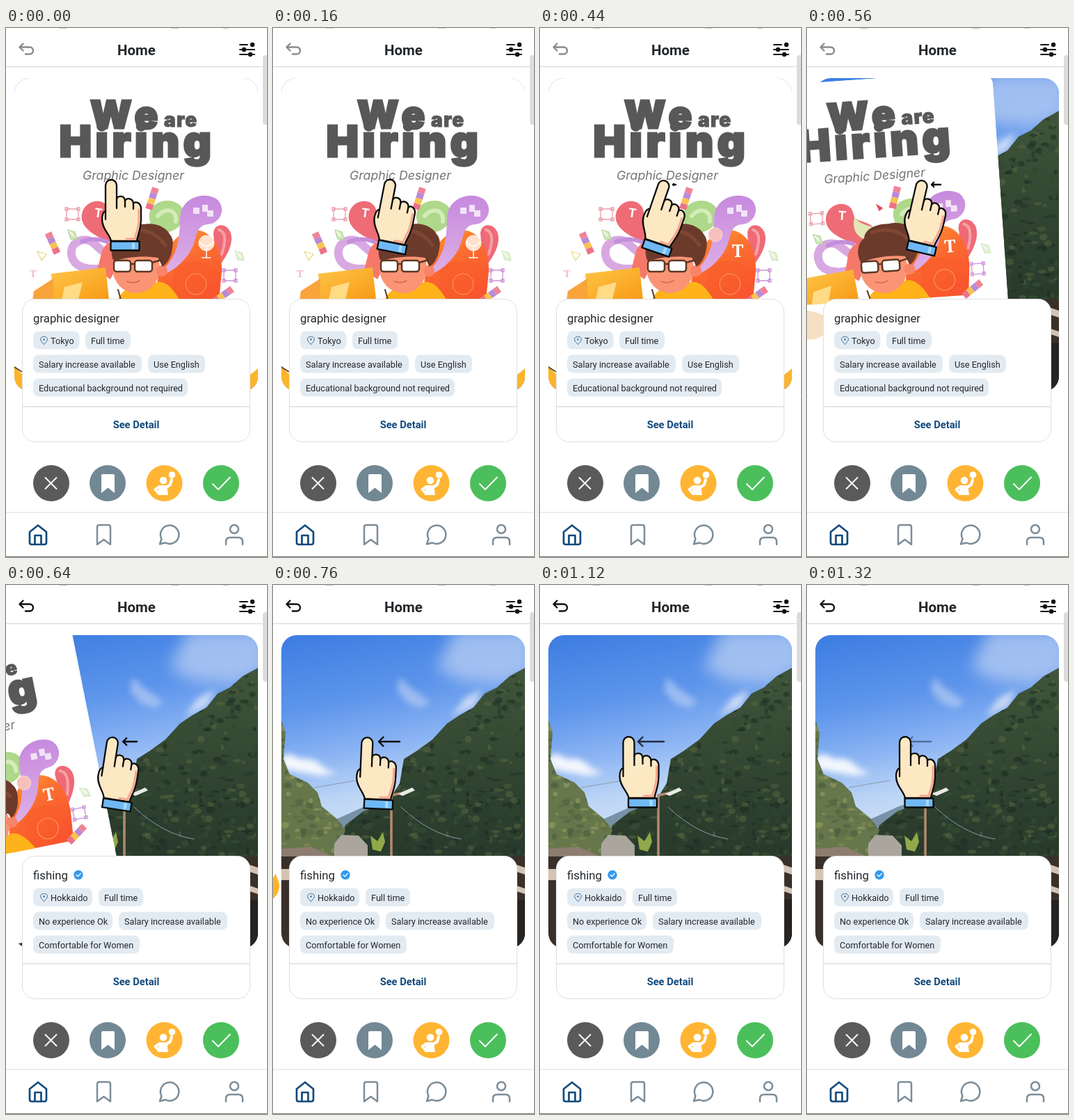
These frames come from a looping animation (375 px wide and 760 px high, 1.36 s). An HTML page:

```html
<!DOCTYPE html>
<html lang="en">
<head>
<meta charset="utf-8">
<title>Job swipe</title>
<style>
html, body { margin: 0; width: 100%; height: 100%; overflow: hidden; background: #fff; }
svg { display: block; width: 375px; height: 760px; }
text { font-family: Roboto, "Open Sans", sans-serif; fill: #23272b; }
.display { font-family: Inter, "Open Sans", sans-serif; fill: #585858; stroke: #585858; font-weight: 900; }
.role { font-family: Inter, "Open Sans", sans-serif; font-style: italic; fill: #747474; }
.line { fill: none; stroke-linecap: round; stroke-linejoin: round; }
.chip { fill: #e3ebf2; }
.chip-text { font-size: 12.7px; }
.title { font-size: 16.8px; }
</style>
</head>
<body>
<svg viewBox="0 0 375 760" xmlns="http://www.w3.org/2000/svg">
  <defs>
    <clipPath id="frame"><rect x="12" y="72" width="350" height="450" rx="22"/></clipPath>
    <linearGradient id="sky" x1="0.15" y1="0" x2="0.3" y2="1">
      <stop offset="0" stop-color="#3f7fe2"/><stop offset=".22" stop-color="#5d95eb"/>
      <stop offset=".38" stop-color="#8ab3f3"/><stop offset=".52" stop-color="#bcd5f6"/><stop offset=".65" stop-color="#cfdff3"/>
    </linearGradient>
    <linearGradient id="hill" x1="0" y1="0" x2="0" y2="1">
      <stop offset="0" stop-color="#40563a"/><stop offset=".5" stop-color="#2d3f2e"/><stop offset="1" stop-color="#222f26"/>
    </linearGradient>
    <linearGradient id="sun" x1="0" y1="0" x2=".4" y2="1">
      <stop offset="0" stop-color="#ff9a30"/><stop offset=".5" stop-color="#fb6c30"/><stop offset="1" stop-color="#f9552e"/>
    </linearGradient>
    <linearGradient id="book" x1="0" y1="0" x2="1" y2="1">
      <stop offset="0" stop-color="#ffc648"/><stop offset="1" stop-color="#f79a16"/>
    </linearGradient>
    <linearGradient id="lilac" x1="0" y1="0" x2="0" y2="1">
      <stop offset="0" stop-color="#c68ade"/><stop offset="1" stop-color="#dfb0e6"/>
    </linearGradient>
    <filter id="soft" x="-30%" y="-30%" width="160%" height="160%"><feGaussianBlur stdDeviation="5"/></filter>
    <filter id="haze" x="-40%" y="-40%" width="180%" height="180%"><feGaussianBlur stdDeviation="11"/></filter>
    <clipPath id="rightHill"><path id="ridge" d="M362 119 L340 131 322 147 304 156 288 176 268 187 250 199 229 222 207 238 188 250 182 285 165 312 130 325 104 345 90 395 V522 H362Z"/></clipPath>
    <clipPath id="leftHill"><path id="bank" d="M12 194 L18 212 15 250 24 272 50 284 64 298 70 318 92 336 104 352 90 395 H12Z"/></clipPath>
  </defs>

  <g id="photo" clip-path="url(#frame)">
    <rect x="12" y="72" width="350" height="450" fill="url(#sky)"/>
    <path d="M262 65 H375 V125 L330 142 270 138 235 120Z" fill="#bacff3" opacity=".75" filter="url(#haze)"/>
    <g fill="#b4cbf2" filter="url(#soft)">
      <path d="M182 132 L196 146 226 168 214 177 194 170 178 152Z" opacity=".7"/>
      <path d="M256 190 L276 162 300 150 290 174Z" fill="#dfe8f8" opacity=".8"/>
      <path d="M12 245 Q28 240 38 250 Q60 246 74 264 L92 270 70 274 Q40 270 12 264Z" fill="#f4f7fd"/>
    </g>
    <path d="M85 395 L92 336 132 318 190 300 V395Z" fill="#7792a6"/>
    <use href="#ridge" fill="url(#hill)"/>
    <g id="leavesR" clip-path="url(#rightHill)"/>
    <use href="#bank" fill="#66774c"/>
    <g id="leavesL" clip-path="url(#leftHill)"/>
    <path d="M60 291 L118 281 M184 319 Q225 358 270 365" class="line" stroke="#8b9aa5" stroke-width="1"/>
    <path d="M88 372 L98 359 123 360 136 374 V392 H88Z" fill="#aaa69e"/>
    <path d="M12 379 L55 376 88 391 H12Z" fill="#8d7d70"/>
    <path d="M140 360 l10 8 8-13 3 14 -6 14 -12-3Z" fill="#91a84a"/>
    <path d="M170 390 V302 L190 298" class="line" stroke="#b38b6d" stroke-width="3.5"/>
    <path d="M180 300 L200 291 204 295 186 303Z" fill="#e6ebe6"/>
    <path d="M12 390 H362 V522 H12Z" fill="#3a302a"/>
    <path d="M12 408 H24 V424 H12Z M350 402 L362 406 V416 L350 412Z M350 432 L362 436 V444 L350 440Z" fill="#d4c3b3"/>
    <path d="M350 452 H362 V522 H350Z" fill="#272321"/>
  </g>

  <g id="card"><g clip-path="url(#frame)">
    <rect x="12" y="72" width="350" height="450" fill="#fff"/>
    <text class="display" x="121" y="144" font-size="55" letter-spacing="7" stroke-width="3">We</text>
    <text class="display" x="227" y="141.5" font-size="28" letter-spacing="1.2" stroke-width="1">are</text>
    <text class="display" x="76.5" y="185" font-size="62" letter-spacing="5.6" stroke-width="3">Hiring</text>
    <text class="role" x="110" y="218" font-size="17.7">Graphic Designer</text>

    <path d="M207 278 C200 255 225 243 242 250 C263 258 258 281 242 290 L210 303Z" fill="#aed88a"/>
    <path d="M218 270 C230 256 246 262 244 278" class="line" stroke="#d4ecb8" stroke-width="6"/>
    <path d="M298 295 C299 280 317 279 323 295 C328 313 313 334 302 347Z" fill="#ee6a76"/>
    <path d="M306 290 Q320 294 310 325" class="line" stroke="#f7a0a4" stroke-width="4"/>
    <path d="M215 392 C217 330 240 291 272 290 C300 292 311 322 310 350 Q308 370 306 392Z" fill="url(#sun)"/>
    <path d="M241 345 Q267 324 301 345 Q295 374 270 391 H240Z" fill="#f95e2b" opacity=".6"/>
    <circle cx="273" cy="368" r="15" fill="none" stroke="#ff9c61"/>
    <path d="M250 272 C252 242 286 234 303 246 C318 260 307 281 291 282 C269 284 277 303 263 324 C248 345 230 355 216 357 C250 327 249 303 250 272Z" fill="url(#lilac)"/>
    <path d="M269 258 h9 v9 h-9z M282 254 h8 v8 h8 v9 h-9 v-7 h-7z" fill="#fff" opacity=".75"/>
    <path d="M157 310 C115 296 103 279 111 261 C121 243 147 245 149 265 C150 279 172 272 181 294Z" fill="#ee6c76"/>
    <path d="M150 268 C158 284 172 278 184 294 L166 304 C148 296 146 284 150 268Z" fill="#e3e6b6"/>
    <text x="127" y="272" font-size="18" font-weight="700" transform="rotate(8 134 266)" style="fill:#fff">T</text>
    <path d="M155 340 C136 349 97 351 94 325 C92 307 114 297 128 311 C137 319 146 329 160 326" class="line" stroke="#d8a8e2" stroke-width="12"/>
    <path d="M145 307 Q126 300 109 307" class="line" stroke="#c48fda" stroke-width="6"/>
    <path d="M138 320 C148 300 165 302 166 330 L150 361 131 348Z" fill="#f5786a"/>

    <g id="sceneA">
      <circle cx="288" cy="309" r="11" fill="#ffe1cc" stroke="#fff6ec"/>
      <path d="M278 307 Q288 320 298 307 M288 316 V329 M282 330 H294" class="line" stroke="#fff" stroke-width="1.5"/>
    </g>
    <g id="sceneB">
      <circle cx="252" cy="297" r="10" fill="#f5c0bb" stroke="#f8d8d0"/>
      <text x="276" y="329" font-size="25" font-weight="700" style="fill:#fff;font-family:'Noto Serif',serif">T</text>
    </g>

    <path d="M160 392 Q170 366 204 373 Q227 350 250 392Z" fill="#fdb319"/>
    <path d="M12 485 Q28 508 66 522 H12Z M290 522 Q330 518 362 489 V522Z" fill="#fdb42a"/>
    <path d="M12 487 L23 494" stroke="#6a4b25" stroke-width="2"/>
    <path d="M65 395 C78 402 103 400 104 424 Q90 446 64 438Z" fill="#f6e0c4"/>
    <ellipse cx="187" cy="345" rx="34" ry="36" fill="#fb9475"/>
    <circle cx="224" cy="349" r="8" fill="#f88467"/>
    <path d="M153 331 C149 315 154 306 162 300 C164 287 180 281 198 282 C216 279 230 287 235 296 C243 305 239 318 237 326 C233 336 230 339 225 343 L218 330 C202 327 174 328 155 335Z" fill="#6c3a2a"/>
    <path d="M174 293 Q208 283 229 312" class="line" stroke="#8a5039" stroke-width="5" opacity=".6"/>
    <g fill="#fff" stroke="#5b3722" stroke-width="2.5">
      <path d="M210 337 L224 333 M179 339 H185" fill="none"/>
      <rect x="155" y="334" width="24" height="16" rx="4"/><rect x="185" y="334" width="25" height="16" rx="4"/>
    </g>
    <path d="M174 364 Q184 368 192 363" class="line" stroke="#da654e" stroke-width="1.5"/>
    <path d="M65 353 L143 344 148 390 H68Z" fill="url(#book)"/>
    <path d="M40 378 L68 360 V392 H38Z" fill="#f8a43b"/>
    <path d="M84 372 L110 365 104 390 H80Z" fill="#ffdb86"/>
    <path d="M161 376 L165 390" class="line" stroke="#5b3722" stroke-width="2"/>
    <g id="swatches"></g>
    <g class="line" stroke="#ec9eac" stroke-width="1.3">
      <path id="crop" d="M87 260 H104 V275 H87Z m-2 -2h4v4h-4z M102 258h4v4h-4z M85 273h4v4h-4z M102 273h4v4h-4z"/>
      <use href="#crop" x="226" y="88" stroke="#cc91d9"/>
      <path d="M45 321 L58 325 51 334Z" stroke="#ead985"/>
      <g id="nib"><path d="M89 290 L99 293 102 304 93 303Z" fill="#d3e8bd" stroke="#b4d69a"/><path d="M91 292 L97 299" stroke="#fff"/></g>
      <use href="#nib" x="240" y="30" opacity=".6"/>
    </g>
    <path d="M182 252 L192 259 186 263Z" fill="#e34e60"/>
    <text x="34" y="358" font-size="15" font-weight="700" style="fill:#f5bcc2;font-family:'Noto Serif',serif">T</text>
  </g></g>

  <rect width="375" height="55" fill="#fff"/>
  <path d="M0 55.5 H375" stroke="#dedede" stroke-width="1.5"/>
  <path d="M76 0 H87 M237 0 H248 M312 0 H320" stroke="#999" stroke-width="1"/>
  <path id="undo" class="line" d="M24.5 22.5 L19.5 27.5 24.5 32.5 M20 27.5 H34 a5 5 0 0 1 0 10 H28" stroke-width="2.4"/>
  <text x="187.5" y="38.5" font-size="20.5" font-weight="700" text-anchor="middle">Home</text>
  <path d="M336 24 H347 M336 31 H340 M346 31 H357 M336 38 H347 M354 38 H357" class="line" stroke="#111" stroke-width="2"/>
  <g fill="#111"><circle cx="354" cy="24" r="3.2"/><circle cx="342" cy="31" r="3.2"/><circle cx="351" cy="38" r="3.2"/></g>
  <rect x="369" y="39" width="9" height="100" rx="4" fill="#dcdcdc"/>

  <rect x="23.5" y="389.5" width="327" height="205" rx="18" fill="#fff" stroke="#dfdfdf"/>
  <path d="M24 544 H350" stroke="#dedede" stroke-width="1.3"/>
  <text x="187" y="574.5" font-size="14.7" font-weight="700" text-anchor="middle" style="fill:#124a7d">See Detail</text>
  <g id="jobA"><text class="title" x="39" y="423">graphic designer</text></g>
  <g id="jobB"><text class="title" x="39" y="423">fishing</text>
    <circle cx="104" cy="416.5" r="6.7" fill="#339af0"/>
    <path class="line" d="M101 416.5 L103.3 418.8 107.2 414.5" stroke="#fff" stroke-width="1.3"/>
  </g>

  <circle cx="65" cy="654" r="26" fill="#5a5a5a"/>
  <circle cx="146" cy="654" r="26" fill="#728894"/>
  <circle cx="227.5" cy="654" r="26" fill="#ffb533"/>
  <circle cx="309" cy="654" r="26" fill="#4bbf5b"/>
  <g class="line" stroke="#fff" stroke-width="1.9">
    <path d="M56.5 646 L72.5 662 M72.5 646 L56.5 662"/>
    <path d="M297 655 L305 663 322 645.5"/>
  </g>
  <path d="M137 642.5 Q137 641 139 641 H154 Q156 641 156 643 V668 L146.5 660.5 137 668Z" fill="#fff"/>
  <g fill="#fff">
    <circle cx="226" cy="650" r="5.3"/><circle cx="238.5" cy="642" r="4.8"/>
    <path d="M220 657 H231 L233 671 H218Z"/>
    <path class="line" stroke="#fff" stroke-width="4" d="M230 660 L236 656 238 649 M220 659 L214.5 663 219 668"/>
  </g>

  <path d="M0 696 H375" stroke="#ededed" stroke-width="2"/>
  <g class="line" stroke="#7d8d99" stroke-width="2.5">
    <path stroke="#124a7d" stroke-width="2.7" d="M34 724 L46 714.5 58 724 V739 Q58 742 55 742 H37 Q34 742 34 739Z M41.5 742 V729 H50.5 V742"/>
    <path d="M131 742 V717 Q131 714 134 714 H147 Q150 714 150 717 V742 L140.5 735Z"/>
    <path d="M221 741.5 L223.5 734 A13.2 13.2 0 1 1 229 739.5Z"/>
    <circle cx="328" cy="720" r="6"/><path d="M316 742 V738 Q316 732 322 732 H334 Q340 732 340 738 V742"/>
  </g>
  <path d="M0 759.5 H375" stroke="#777"/>

  <path id="arrow" class="line" stroke="#0b0b0b" stroke-width="2.4"/>
  <g id="hand" class="line" stroke="#0b0b0b" stroke-width="2.3">
    <path fill="#fde8c4" d="M-28 -50 V-87 A8 8 0 0 1 -12 -87 V-67 C-11 -73 0 -73 0 -64 C1 -70 12 -69 12 -60 C13 -65 23 -63 23 -53 V-40 C23 -22 18 -16 17 -7 H-20 C-22 -17 -33 -24 -33 -38 C-33 -46 -31 -49 -28 -50Z"/>
    <path stroke="#f7a78f" stroke-width="3" d="M20 -52 V-40 C20 -24 15 -17 14 -10 H2"/>
    <path d="M-12 -67 V-54 M0 -64 V-56 M12 -60 V-53 M-28 -50 V-38"/>
    <rect x="-20.5" y="-6.5" width="41" height="13" fill="#6eb9f5"/>
    <path d="M12 -4.5 V4.5" stroke="#a8d9fb" stroke-width="4" stroke-linecap="butt"/>
  </g>
</svg>
<script>
const $ = id => document.getElementById(id);
const STEP = 40, LOOP = 1360;

function add(parent, tag, attrs, text) {
  const el = document.createElementNS("http://www.w3.org/2000/svg", tag);
  for (const k in attrs) el.setAttribute(k, attrs[k]);
  if (text) el.textContent = text;
  parent.append(el);
}

function chip(job, row, x, w, label, pin) {
  const y = 436 + row * 34;
  add(job, "rect", { class: "chip", x, y: y - .5, width: w, height: 26, rx: 8 });
  add(job, "text", { class: "chip-text", x: x + (pin ? 25 : 8), y: y + 17.5 }, label);
  if (!pin) return;
  add(job, "path", { class: "line", stroke: "#386c9b", d: "M54.5 454.5 C46 447 50 443.5 54.5 443.5 S63 447 54.5 454.5Z" });
  add(job, "circle", { cx: 54.5, cy: 447.5, r: 1.3, fill: "#386c9b" });
}

chip($("jobA"), 0, 39, 66.5, "Tokyo", true);
chip($("jobA"), 0, 114, 65, "Full time");
chip($("jobA"), 1, 39, 156, "Salary increase available");
chip($("jobA"), 1, 204, 82, "Use English");
chip($("jobA"), 2, 39, 222, "Educational background not required");
chip($("jobB"), 0, 39, 85, "Hokkaido", true);
chip($("jobB"), 0, 133, 64, "Full time");
chip($("jobB"), 1, 39, 114, "No experience Ok");
chip($("jobB"), 1, 162, 156, "Salary increase available");
chip($("jobB"), 2, 39, 153, "Comfortable for Women");

// Seeded foliage
let seed = 7;
const rand = () => (seed = seed * 16807 % 2147483647) / 2147483647;
function leaves(group, n, [x, y, w, h], colors) {
  for (let i = 0; i < n; i++) add(group, "ellipse", {
    cx: (x + rand() * w).toFixed(1), cy: (y + rand() * h).toFixed(1),
    rx: (2 + rand() * 5).toFixed(1), ry: (1.5 + rand() * 3.5).toFixed(1),
    fill: colors[Math.floor(rand() * colors.length)], opacity: .55
  });
}
leaves($("leavesR"), 480, [90, 115, 272, 275], ["#1c2b22", "#22342a", "#3a5036", "#55663f", "#2f4632"]);
leaves($("leavesL"), 130, [12, 194, 92, 200], ["#85914f", "#48603f", "#98a266", "#5a6b40"]);

for (const [x, y, a] of [[210, 245, 18], [67, 309, -24], [312, 384, 55]])
  ["#ef8497", "#b98ad8", "#f8c34e", "#ed7188"].forEach((fill, i) => add($("swatches"), "rect", {
    x: x - 5, y: y - 16 + i * 8, width: 10, height: 8, fill, transform: `rotate(${a} ${x} ${y})`
  }));

// Rows: time, then values
const handKeys = [
  [0, 171, 313, 0], [160, 171, 315, 11], [280, 169.8, 315.7, 16.5], [440, 168, 316, 19],
  [560, 164.5, 316.5, 13], [760, 151.5, 315, 2.5], [860, 148, 313.5, .5], [940, 147.5, 313, 0],
  [1160, 147.5, 313, 0], [1240, 150.5, 313, 0], [1320, 161, 313, 0], [1360, 171, 313, 0]
];
const cardKeys = [[0, 0], [480, 0], [520, -28], [560, -80], [600, -150], [680, -300], [760, -415], [800, -480]];
const arrowKeys = [
  [440, 191, 195, 1], [560, 179, 192, 1], [760, 152, 182, 1], [900, 142, 178.5, 1],
  [1060, 141, 178, 1], [1120, 141, 178, .8], [1320, 145, 178, .4], [1360, 146, 178, .2]
];

function at(keys, t) {
  const last = keys[keys.length - 1];
  if (t >= last[0]) return last.slice(1);
  const i = Math.max(1, keys.findIndex(k => k[0] > t));
  const a = keys[i - 1], b = keys[i];
  const p = Math.max(0, (t - a[0]) / (b[0] - a[0]));
  return a.slice(1).map((v, j) => v + (b[j + 1] - v) * p);
}
const show = (id, on) => $(id).setAttribute("visibility", on ? "visible" : "hidden");

function draw(t) {
  const [hx, hy, turn] = at(handKeys, t);
  $("hand").setAttribute("transform", `translate(${hx} ${hy}) rotate(${turn})`);

  const [dx] = at(cardKeys, t);
  $("card").setAttribute("transform", `translate(${dx} 0) rotate(${dx / 20} 187 297)`);
  show("card", t < 800);
  show("sceneA", t < 320);
  show("sceneB", t >= 320 && t < 800);

  const swiped = t >= 640;
  show("jobA", !swiped);
  show("jobB", swiped);
  $("undo").setAttribute("stroke", swiped ? "#111" : "#8a8a8a");

  const [head, tail, alpha] = at(arrowKeys, t);
  const s = Math.min(6.5, (tail - head) * .25);
  $("arrow").setAttribute("d", `M${tail} 225 H${head} M${head + s} ${225 - s} L${head} 225 ${head + s} ${225 + s}`);
  $("arrow").setAttribute("opacity", alpha);
  show("arrow", t >= 440);
}

const start = performance.now();
function tick() {
  const t = (performance.now() - start) % LOOP;
  draw(Math.floor(t / STEP) * STEP);
  requestAnimationFrame(tick);
}
draw(0);
requestAnimationFrame(tick);
</script>
</body>
</html>
```
